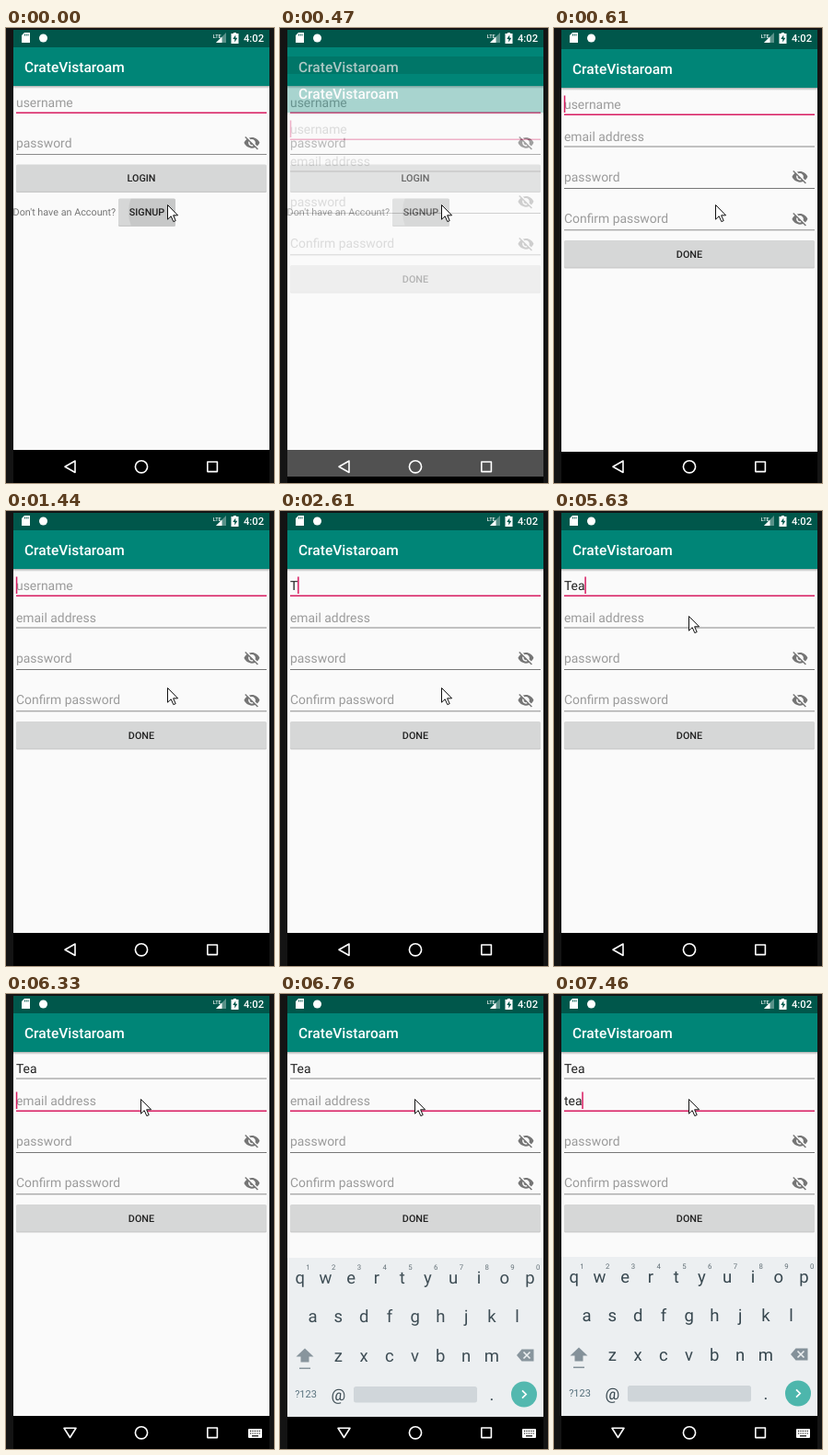
Recreate the animation shown at these times as an HTML page. Size 291x495 px, loop 8000 ms.

```html
<!DOCTYPE html>
<html lang="en">
<head>
<meta charset="utf-8">
<title>Sign-up form</title>
<style>
  html, body { margin: 0; width: 100%; height: 100%; overflow: hidden; background: #141414; }
  svg { display: block; width: 291px; height: 495px; }
  text { font-family: Roboto, sans-serif; text-rendering: geometricPrecision; white-space: pre; }
  .bold { font-weight: 500; }
  .mid { text-anchor: middle; }
</style>
</head>
<body>
<svg id="stage" viewBox="0 0 291 495"></svg>
<script>
const APP_NAME = 'CrateVistaroam';
const LOOP = 8000;
const ACCENT = '#d81b60';
const INK = '#212121';
const HINT = '#9b9b9b';
const LEFT = 11;

const rect = (x, y, w, h, fill, more = '') =>
  `<rect x="${x}" y="${y}" width="${w}" height="${h}" fill="${fill}" ${more}/>`;
const text = (x, y, size, fill, str, more = '') =>
  `<text x="${x}" y="${y}" font-size="${size}" fill="${fill}" ${more}>${str}</text>`;
const path = (d, more) => `<path d="${d}" ${more}/>`;

const line = (y, color = '#8a8a8a', h = 1, id = '') =>
  rect(LEFT, y, 272, h, color, id && `id="${id}"`);
const hint = (base, str, id = '') => text(LEFT, base, 13.9, HINT, str, id && `id="${id}"`);
const button = (x, y, w, label) =>
  rect(x, y + 1, w, 29.4, '#000', 'rx="1.5" opacity=".2"') +
  rect(x, y, w, 29.2, '#d6d7d7', 'rx="1.5"') +
  text(x + w / 2, y + 18.6, 10.8, INK, label, 'class="bold mid"');

const eyeOff = y => `<g transform="translate(257.7 ${y - 9.4}) scale(.772)" fill="#757575">` + path(
  'M12 7c2.76 0 5 2.24 5 5 0 .65-.13 1.26-.36 1.83l2.92 2.92c1.51-1.26 2.7-2.89 3.43-4.75' +
  '-1.73-4.39-6-7.5-11-7.5-1.4 0-2.74.25-3.98.7l2.16 2.16C10.74 7.13 11.35 7 12 7z' +
  'M2 4.27l2.74 2.74C3.08 8.3 1.78 10.02 1 12c1.73 4.39 6 7.5 11 7.5 1.55 0 3.03-.3 4.38-.84' +
  'L19.73 22 21 20.73 3.27 3zM7.53 9.8l1.55 1.55c-.05.21-.08.43-.08.65 0 1.66 1.34 3 3 3' +
  ' .22 0 .44-.03.65-.08l1.55 1.55c-.67.33-1.41.53-2.2.53-2.76 0-5-2.24-5-5 0-.79.2-1.53.53-2.2z', '') + '</g>';

const screen = (id, body) => `<g id="${id}">` +
  rect(8, 2, 278, 457, '#fafafa') +
  rect(8, 2, 278, 19, '#00574b') +
  rect(8, 63, 278, 3, 'url(#shade)') +
  rect(8, 21, 278, 42, '#008577') +
  text(20, 48, 15.5, '#fff', APP_NAME, 'class="bold"') + body + '</g>';

const login = screen('login',
  hint(86, 'username') + line(91.5, ACCENT, 1.5) +
  hint(130, 'password') + line(137) + eyeOff(125) +
  button(11, 148.5, 272, 'LOGIN') +
  text(7.6, 204, 10.8, '#757575', "Don't have an Account?") +
  button(122, 185.5, 62, 'SIGNUP') +
  '<circle cx="175" cy="200" r="42" opacity=".07" clip-path="url(#press)"/>');

const signup = screen('signup',
  hint(86, 'username', 'userText') + line(91.5, ACCENT, 1.5, 'userLine') +
  hint(121, 'email address', 'mailText') + line(126.5, '#8a8a8a', 1, 'mailLine') +
  hint(165, 'password') + line(172, '#777') + eyeOff(160) +
  hint(210, 'Confirm password') + line(217.3) + eyeOff(206) +
  button(11, 229, 272, 'DONE') +
  rect(0, 0, 1.5, 18.5, ACCENT, 'id="caret"'));

const statusIcons =
  path('M20 5h6v11h-9v-8z', 'fill="#fff"') +
  path('M20.5 6.5v2M22.3 6.5v2M24.1 6.5v2', 'stroke="#00574b" stroke-width=".9"') +
  '<circle cx="40.5" cy="11" r="4.5" fill="#fff"/>' +
  text(224.8, 10.5, 5.5, '#fff', 'LTE', 'class="bold"') +
  path('M239 5v11h-11z', 'fill="#fff" opacity=".35"') +
  path('M234.5 9.5v6.5h-6.5z', 'fill="#fff"') +
  path('M247 6v-1h3v1h2.5v11h-8v-11z', 'fill="#fff"') +
  path('M249.3 7.5l-3 4.5h2v3.5l3-4.7h-2z', 'fill="#00574b"') +
  text(280, 15, 11.2, '#fff', '4:02', 'class="bold" text-anchor="end"');

const keyRow = (x, y, letters) => [...letters].map((c, i) =>
  text(x + i * 27.75, y, 18.5, '#37474f', c, 'class="mid"')).join('');

const keyboard = '<g id="keyboard">' +
  rect(8, 286, 278, 173, '#eceff1') +
  keyRow(21.7, 313.5, 'qwertyuiop') +
  [...'1234567890'].map((c, i) => text(30.5 + i * 27.75, 298.5, 7.8, '#5f6d74', c, 'class="mid"')).join('') +
  keyRow(35.6, 356, 'asdfghjkl') +
  keyRow(63.3, 398.5, 'zxcvbnm') +
  path('M27 384.5l9.5 9h-5v6h-9v-6h-5zM21 405.5h12v1.5h-12z', 'fill="#84919a"') +
  path('M262.5 385.5h13v13h-13l-5.5-6.5z', 'fill="#84919a"') +
  path('M264.5 388.5l7 7m0-7l-7 7', 'stroke="#eceff1" stroke-width="1.6"') +
  text(28, 438.3, 11, '#546e7a', '?123', 'class="mid"') +
  text(63.3, 440.5, 17.5, '#37474f', '@', 'class="mid"') +
  rect(80, 426, 134, 17.5, '#cfd5d9', 'rx="2.5"') +
  text(230, 440.5, 18.5, '#37474f', '.', 'class="mid"') +
  '<circle cx="265" cy="434.5" r="14" fill="#4db6ac"/>' +
  path('M263 430.3l4.2 4.2-4.2 4.2', 'fill="none" stroke="#fff" stroke-width="1.7"') + '</g>';

const navIcons = '<g fill="none" stroke="#fff" stroke-width="1.6" stroke-linejoin="round">' +
  path('M75 471v12.5l-11-6.2z', 'id="back"') +
  path('M63 472.3h13l-6.5 10.2z', 'id="down"') +
  '<circle cx="147" cy="477.3" r="6.6"/>' +
  rect(218.8, 472, 10.6, 10.6, 'none') + '</g>' +
  '<g id="switcher">' + rect(263, 473, 15, 10, '#fff', 'rx="1"') +
  path('M265 475.5h11M265 478h11', 'stroke="#000" stroke-width="1.2" stroke-dasharray="1.2 1.2"') +
  path('M267 480.8h7', 'stroke="#000" stroke-width="1.2"') + '</g>';

const pointer = path('M.5.5v15.7l3.7-3.5 2.6 5.9 2.4-1-2.6-5.8h5z',
  'id="pointer" fill="#fff" stroke="#111" stroke-width="1"');

document.getElementById('stage').innerHTML =
  '<defs><linearGradient id="shade" x2="0" y2="1"><stop stop-opacity=".3"/><stop offset="1" stop-opacity="0"/></linearGradient>' +
  '<clipPath id="press">' + rect(122, 185.5, 62, 29.2, '#000', 'rx="1.5"') + '</clipPath></defs>' +
  rect(0, 0, 291, 495, '#141414') + rect(8, 459, 278, 36, '#000') +
  login + signup + keyboard + statusIcons + navIcons + pointer;

// Each track lists [start, value]; a value holds until the next start.
const tracks = {
  slide: [[0, null], [470, [29, .32]], [610, [2, 1]], [730, [0, 1]]],
  user: [[0, ''], [2610, 'T'], [3470, 'Te'], [3720, 'Tea']],
  mail: [[0, ''], [7030, 't'], [7310, 'te'], [7460, 'tea']],
  caret: [[0, 1], [1030, 0], [1440, 1], [2030, 0], [2460, 1], [3040, 0], [3470, 1],
    [4150, 0], [4650, 1], [5200, 0], [5630, 1], [6610, 0], [7030, 1]],
  pointer: [[0, [175, 192]], [4150, [175, 191]], [4290, [170, 178]], [4410, [158, 145]],
    [4530, [149, 121]], [4650, [146, 114]]],
  keys: [[0, null], [6760, [1, .96]], [6880, [0, 1]]],
};
const at = (name, t) => tracks[name].findLast(([start]) => start <= t)[1];

const $ = id => document.getElementById(id);
const set = (id, attrs) => Object.entries(attrs).forEach(([k, v]) => $(id).setAttribute(k, v));
const show = (id, on) => set(id, { visibility: on ? 'visible' : 'hidden' });

function place(id, state) {
  const [dy, opacity] = state || [0, 0];
  set(id, { transform: `translate(0 ${dy})`, opacity });
}

function field(id, value, placeholder) {
  $(id).textContent = value || placeholder;
  set(id, { fill: value ? INK : HINT });
  return value ? $(id).getComputedTextLength() : 0;
}

function underline(id, y, focused) {
  set(id, focused ? { y, height: 1.5, fill: ACCENT } : { y, height: 1, fill: '#8a8a8a' });
}

function draw(t) {
  place('signup', at('slide', t));
  place('keyboard', at('keys', t));

  const onMail = t >= 6030;
  const userWidth = field('userText', at('user', t), 'username');
  const mailWidth = field('mailText', at('mail', t), 'email address');
  underline('userLine', 91.5, !onMail);
  underline('mailLine', 126.5, t >= 5880);
  set('caret', {
    x: LEFT - .2 + (onMail ? mailWidth : userWidth),
    y: onMail ? 106.5 : 71.5,
    opacity: at('caret', t),
  });

  const typing = t >= 6330;
  show('back', !typing);
  show('down', typing);
  show('switcher', typing);
  set('pointer', { transform: `translate(${at('pointer', t)})` });
}

function tick() {
  draw(performance.now() % LOOP);
  requestAnimationFrame(tick);
}
tick();
</script>
</body>
</html>
```
